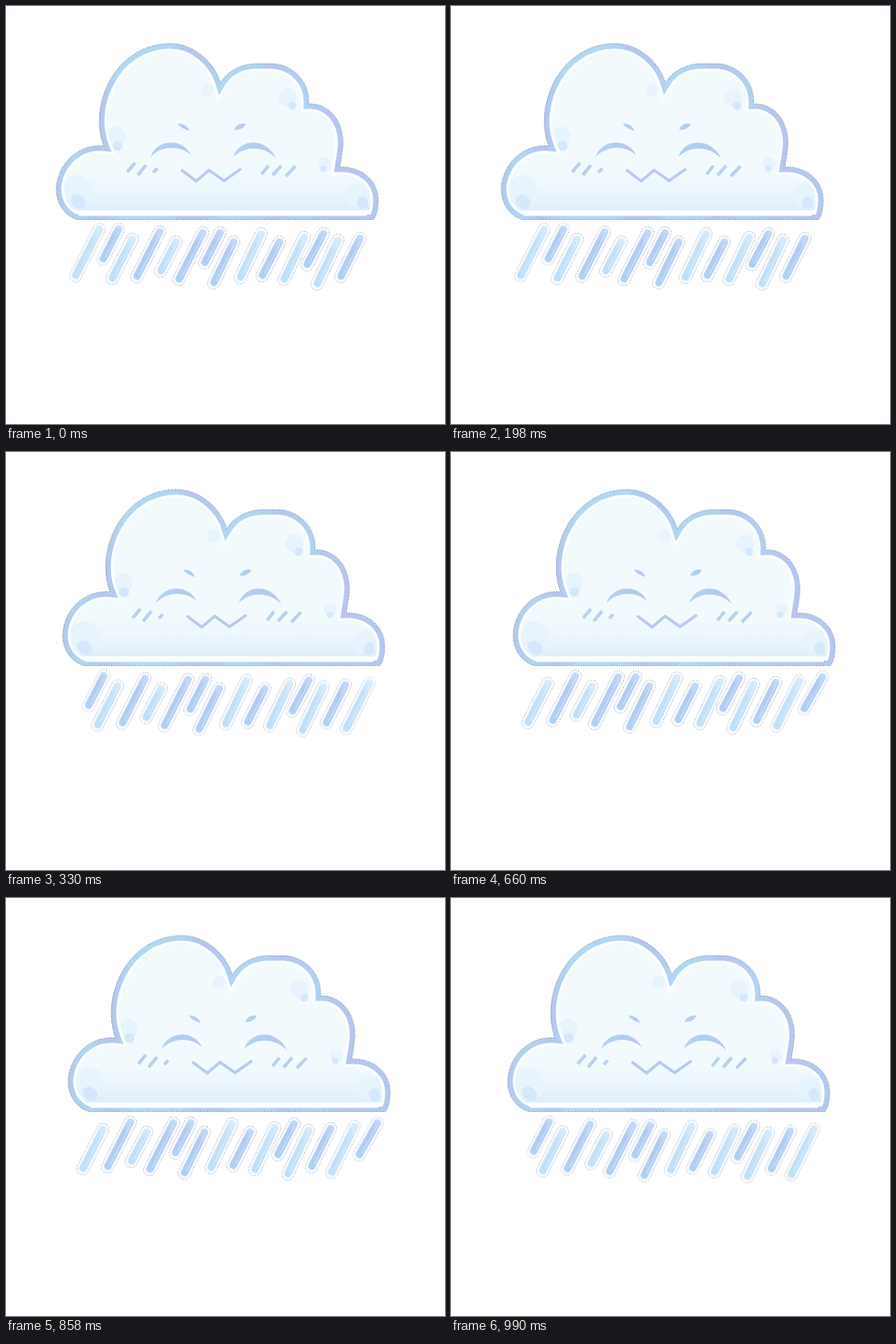
An HTML page for the animation above (1.32 s loop, 480 by 457 pixels).

```html
<!DOCTYPE html>
<html lang="en">
<head>
<meta charset="utf-8">
<title>Rain cloud</title>
<style>
  html, body { margin: 0; width: 100%; height: 100%; overflow: hidden; background: #fff; }
  svg { display: block; width: 100vw; height: 100vh; }

  #cloud, #face, #rain, .drop { animation: 1320ms step-end infinite; }
  #cloud { animation-name: sway; }
  #face { animation-name: face; }
  #rain { animation-name: rain; }
  .leaves1 { animation-name: leaves1; }
  .leaves2 { animation-name: leaves2; }
  .enters1 { animation-name: enters1; }
  .enters2 { animation-name: enters2; }

  @keyframes sway {
    0% { transform: none; }
    25%, 75% { transform: translate(7px, 0); }
    50% { transform: translate(13px, 0); }
  }
  @keyframes face {
    0% { transform: none; }
    25%, 75% { transform: translate(6px, 0); }
    50% { transform: translate(12px, 0); }
  }
  @keyframes rain {
    0% { transform: none; }
    25%, 75% { transform: translate(-16px, .6px); }
    50% { transform: translate(-32px, -2px); }
  }
  /* drops at the ends of the row come and go as it slides */
  @keyframes leaves1 { 0% { opacity: 1; } 25%, 100% { opacity: 0; } }
  @keyframes leaves2 { 0%, 25%, 75% { opacity: 1; } 50% { opacity: 0; } }
  @keyframes enters1 { 0% { opacity: 0; } 25%, 100% { opacity: 1; } }
  @keyframes enters2 { 0%, 25%, 75% { opacity: 0; } 50% { opacity: 1; } }

  .edge { fill: none; stroke: #66738f; stroke-width: .8; stroke-dasharray: 1 1.6; }
  .pale { fill: #e7f4fd; }
  .spot { fill: #d5e7fb; }
</style>
</head>
<body>
<svg viewBox="0 0 480 457">
  <defs>
    <path id="shape" d="M78 233.5 C63 229 55 215 55 200 C56 172 80 150 107 153
      C90 110 118 42 179 41 C206 41 228 62 234.500 84 C243 70 258 63 275 63 H292
      C316 65 332 84 331 107 C352 106 368.500 124 368.500 150 C368 160 366 169 365 176
      C390 175 407 192 407 212 C407 222 405 229 402 233.500 Z"/>
    <clipPath id="inside"><use href="#shape"/></clipPath>
    <linearGradient id="rim" gradientUnits="userSpaceOnUse" x1="55" y1="0" x2="407" y2="0">
      <stop offset="0" stop-color="#b3c8ee"/>
      <stop offset=".06" stop-color="#b0d6f2"/>
      <stop offset=".13" stop-color="#b5c4ee"/>
      <stop offset=".2" stop-color="#b1d9f3"/>
      <stop offset=".35" stop-color="#b0d6f3"/>
      <stop offset=".4" stop-color="#b5c6ef"/>
      <stop offset=".47" stop-color="#b4c8ef"/>
      <stop offset=".52" stop-color="#b0d8f3"/>
      <stop offset=".63" stop-color="#b0d2f2"/>
      <stop offset=".66" stop-color="#b7c3f0"/>
      <stop offset=".77" stop-color="#b0d2f1"/>
      <stop offset=".84" stop-color="#b7c5f0"/>
      <stop offset="1" stop-color="#b3c8ef"/>
    </linearGradient>
    <linearGradient id="body" gradientUnits="userSpaceOnUse" x1="0" y1="180" x2="0" y2="224">
      <stop offset="0" stop-color="#f2fafd"/>
      <stop offset=".4" stop-color="#eef7fd"/>
      <stop offset="1" stop-color="#dfeefb"/>
    </linearGradient>
    <linearGradient id="lid" x1="0" x2="1">
      <stop offset="0" stop-color="#b3d4f0"/>
      <stop offset=".5" stop-color="#b1cdef"/>
      <stop offset="1" stop-color="#bac5ee"/>
    </linearGradient>
    <linearGradient id="light" x1="0" y1="0" x2="0" y2="1">
      <stop offset="0" stop-color="#d9edfa"/>
      <stop offset=".3" stop-color="#c3e1f6"/>
      <stop offset="1" stop-color="#bfdff7"/>
    </linearGradient>
    <linearGradient id="dark" x1="0" y1="0" x2="0" y2="1">
      <stop offset="0" stop-color="#c4dcf5"/>
      <stop offset=".3" stop-color="#b2c9ef"/>
      <stop offset="1" stop-color="#b0d0f1"/>
    </linearGradient>
  </defs>

  <g id="rain"></g>

  <g id="cloud">
    <g clip-path="url(#inside)">
      <use href="#shape" fill="url(#body)"/>
      <ellipse class="pale" cx="78" cy="203" rx="17" ry="18"/>
      <ellipse class="pale" cx="386" cy="208" rx="14" ry="13"/>
      <ellipse class="pale" cx="121" cy="143" rx="10" ry="11"/>
      <circle class="pale" cx="308" cy="100" r="10"/>
      <circle class="pale" cx="220" cy="92" r="7"/>
      <circle class="pale" cx="348" cy="172" r="7"/>
      <ellipse class="spot" cx="79" cy="214" rx="9" ry="7" transform="rotate(35 79 214)"/>
      <ellipse class="spot" cx="390" cy="215" rx="6" ry="7"/>
      <circle class="spot" cx="122" cy="153" r="5.500"/>
      <circle class="spot" cx="313" cy="109" r="4.500"/>
      <circle class="spot" cx="347" cy="178" r="3.500"/>
      <use href="#shape" fill="none" stroke="#fbfeff" stroke-width="17"/>
      <use href="#shape" fill="none" stroke="url(#rim)" stroke-width="11"/>
      <path d="M76 223.500 H398 L394 229.500 H80 Z" fill="#fbfeff"/>
    </g>
    <use href="#shape" class="edge"/>
  </g>

  <g id="face">
    <g fill="url(#lid)">
      <path d="M158 165 C165 145 193 144 202.500 163 C190 152 171 152 158 165 Z"/>
      <path d="M248.500 165 C256 144 284 144 295 166 C281 153 263 152 248.500 165 Z"/>
      <path d="M188 128.500 C193 128 199 131 200.500 136.500 C196 135 190 133 188 128.500 Z"/>
      <path d="M249.500 135.500 C251 130 257 127.500 262 129 C261 133 255 136 249.500 135.500 Z"/>
    </g>
    <path d="M191.500 179 L208 191.500 L222 179.500 L238.500 191 L257 178" fill="none" stroke="#b6caee" stroke-width="3.200"/>
    <g stroke="#b7d0ef" stroke-width="3.600">
      <path d="M132.500 181.500 L141 171.500 M144 185 L153 174 M161 182 L165.500 177.500 M279.500 184 L287 174.500 M291.500 185 L301 174.500 M306 186 L316.500 175"/>
    </g>
  </g>
</svg>

<script>
  // Each drop: top x, top y, bottom x, bottom y
  const drops = [
    [102, 244, 76, 295], [123, 244, 106, 277], [138, 255, 116, 298], [168, 247, 143, 296],
    [186, 258, 169, 290], [215, 248, 189, 299], [234, 248, 217, 281], [249, 258, 227, 303],
    [279, 249, 256, 297], [299, 258, 280, 295], [326, 253, 304, 299], [347, 249, 329, 283],
    [363, 256, 340, 304], [387, 254, 366, 296], [413, 252, 388, 302], [438, 248, 418, 283]
  ];
  const edgeClass = { 0: 'leaves1', 1: 'leaves2', 14: 'enters1', 15: 'enters2' };

  const capsule = (r, length, attrs) =>
    `<rect x="${-r}" y="${-r}" width="${2 * r}" height="${length + 2 * r}" rx="${r}" ${attrs}/>`;

  document.getElementById('rain').innerHTML = drops.map(([x1, y1, x2, y2], i) => {
    const dx = x2 - x1, dy = y2 - y1;
    const length = Math.hypot(dx, dy);
    const angle = Math.atan2(-dx, dy) * 180 / Math.PI;
    const tone = i % 2 || i === 6 ? 'dark' : 'light';
    return `<g class="drop ${edgeClass[i] || ''}">
      <g transform="translate(${x1} ${y1}) rotate(${angle})">
        ${capsule(6.6, length, 'fill="#fff"')}
        ${capsule(6.6, length, 'class="edge" opacity=".75"')}
        ${capsule(4.6, length, 'fill="#e9f5fd"')}
        ${capsule(3.9, length - 1, `y="0" fill="url(#${tone})"`)}
        <path d="M1.500 3 V${length - 4}" stroke="#fff" stroke-opacity=".3" stroke-width="1.500" stroke-linecap="round"/>
      </g>
    </g>`;
  }).join('');
</script>
</body>
</html>
```
